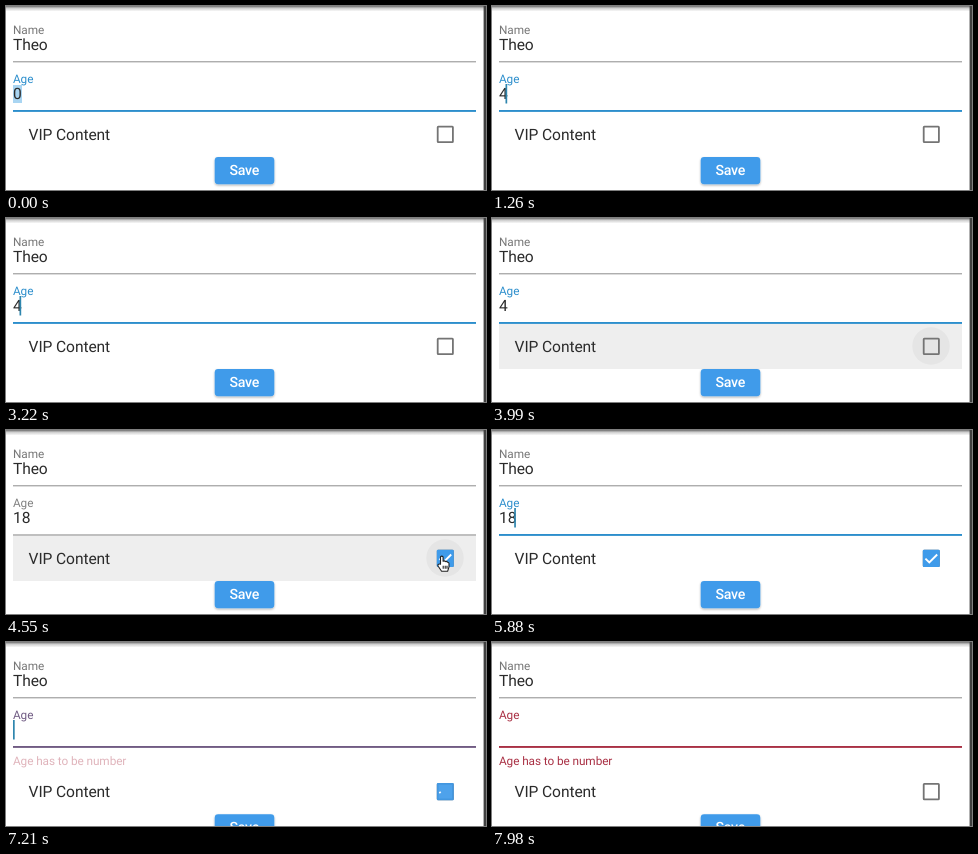
Recreate the animation shown at these times as an HTML page. Size 480 by 184 pixels, loop 8000 ms.

```html
<!DOCTYPE html>
<html lang="en">
<head>
<meta charset="utf-8">
<title>Profile form</title>
<style>
  html, body { margin: 0; width: 100%; height: 100%; overflow: hidden; background: #fff; }
  svg { display: block; width: 480px; height: 184px; }
  text {
    font-family: Roboto, "Open Sans", sans-serif; font-size: 15.6px; letter-spacing: -.1px;
    fill: #2b2b2b; text-rendering: geometricPrecision;
  }
  .small { font-size: 11.8px; letter-spacing: -.08px; fill: #777; }
  .button { font-size: 14.2px; letter-spacing: -.3px; font-weight: 500; fill: #fff; }
</style>
</head>
<body>
<svg viewBox="0 0 480 184">
  <defs>
    <linearGradient id="shade" x1="0" y1="0" x2="0" y2="1">
      <stop offset="0" stop-color="#6c6c6c"/>
      <stop offset=".4" stop-color="#cdcdcd"/>
      <stop offset="1" stop-color="#fff"/>
    </linearGradient>
    <filter id="lift" x="-20%" y="-30%" width="140%" height="180%">
      <feDropShadow dx="0" dy="1.2" stdDeviation="1.2" flood-opacity=".3"/>
    </filter>
  </defs>
  <rect width="480" height="184" fill="#fff"/>
  <rect width="480" height="5.5" fill="url(#shade)"/>

  <text class="small" x="7" y="28">Name</text>
  <text x="7" y="44">Theo</text>
  <rect x="7" y="55.3" width="463" height="1" fill="#8c8c8c"/>

  <g id="lower">
    <rect id="row" x="7" y="106" width="463" height="45" fill="#eee"/>
    <circle id="halo" cx="439" cy="128" r="18.7" fill="#000" fill-opacity=".04"/>
    <text x="22.6" y="133.8">VIP Content</text>
    <rect x="431.7" y="120.7" width="15.2" height="15.4" rx=".6" fill="none" stroke="#747474" stroke-width="1.8"/>
    <g id="checked">
      <rect x="430.8" y="119.8" width="17" height="17.2" rx="1" fill="#3f9bea"/>
      <path id="tick" d="M433.4 128.6 L437.3 132.5 L445.2 124.5" fill="none" stroke="#fff"
        stroke-width="1.9" pathLength="1" stroke-dasharray="1 2"/>
    </g>
    <rect x="208.7" y="151.1" width="59.6" height="27.1" rx="3.4" fill="#3f9bea" filter="url(#lift)"/>
    <text class="button" x="238.3" y="169.3" text-anchor="middle">Save</text>
  </g>

  <text id="label" class="small" x="7" y="77">Age</text>
  <rect id="selection" x="7" y="79" width="9" height="18" fill="#a9d5f2"/>
  <text id="age" x="7" y="93.2"></text>
  <rect id="caret" y="78" width="1.7" height="19.5" fill="#2f86ae"/>
  <rect id="line" x="7" width="463"/>
  <text id="error" class="small" x="7" y="123" style="fill:#a93044">Age has to be number</text>

  <rect x="477.6" y="0" width="2.4" height="184" fill="#404040"/>
  <g id="hand" fill="#fff" stroke="#222" stroke-width="1.1" stroke-linejoin="round">
    <path d="M-1.3 8V1Q-1.3-.2 0-.2Q1.3-.2 1.3 1V5Q2.6 4 3.6 5.3Q5 4.7 5.7 6Q7.2 5.8 7.2 7.4V10.5L5.8 15H-.2L-3.6 10Q-4.4 8.4-3.2 7.9Q-2.3 7.6-1.3 8Z"/>
    <path d="M1.4 9.5V12.5M3.4 9.5V12.5M5.2 9.5V12.5" fill="none"/>
  </g>
</svg>
<script>
  const LOOP = 8000;
  const TYPE = 70, HOVER = 3430, PRESS = 3990, TOGGLE = 4060, LEAVE = 5180,
        FOCUS = 5800, ERASE = 6510, CLEAR = 7130;
  const BLINK = 515, DIGIT = 8.7;
  const GREY = [128, 128, 128], BLUE = [44, 142, 204], RED = [169, 48, 68];

  const el = Object.fromEntries([...document.querySelectorAll("svg [id]")].map(n => [n.id, n]));
  const ramp = (t, start, span) => Math.min(1, Math.max(0, (t - start) / span));
  const smooth = p => p * p * (3 - 2 * p);
  const lerp = (a, b, p) => a + (b - a) * p;
  const mix = (a, b, p) => `rgb(${a.map((v, i) => Math.round(lerp(v, b[i], p)))})`;
  const set = (node, attrs) => { for (const k in attrs) node.setAttribute(k, attrs[k]); };
  const show = (node, on) => set(node, { opacity: Number(on) });

  function ageAt(t) {
    if (t < TYPE) return "0";
    if (t < TOGGLE) return "4";
    if (t < ERASE) return "18";
    return t < CLEAR ? "1" : "";
  }

  // The blink restarts on every edit or focus of the field.
  function caretOn(t) {
    if (t < TYPE || (t >= TOGGLE && t < FOCUS)) return false;
    const start = [CLEAR, ERASE, FOCUS, TYPE].find(s => t >= s);
    return Math.floor((t - start) / BLINK) % 2 === 0;
  }

  function draw(t) {
    const failed = t >= CLEAR;
    const age = ageAt(t);
    const focus = t < FOCUS ? 1 - ramp(t, TOGGLE, 200) : ramp(t, FOCUS, 80);
    const color = failed ? mix(BLUE, RED, ramp(t, CLEAR, 150)) : mix(GREY, BLUE, focus);

    el.age.textContent = age;
    el.label.style.fill = color;
    set(el.line, { y: lerp(104.5, 104, focus), height: lerp(1, 1.9, focus), fill: color });
    show(el.selection, t < TYPE);
    show(el.caret, caretOn(t));
    set(el.caret, { x: 7 + Math.max(0, age.length * DIGIT - 2.2) });
    show(el.error, smooth(ramp(t, CLEAR, 200)));

    set(el.lower, { transform: `translate(0 ${failed ? 21.2 : 0})` });
    show(el.row, t >= PRESS && t < FOCUS);
    show(el.halo, ramp(t, HOVER - 20, 90) * (1 - ramp(t, LEAVE, 100)));
    const check = ramp(t, TOGGLE, 200) * (1 - ramp(t, CLEAR, 150));
    show(el.checked, Math.min(1, check * 2));
    show(el.tick, check > .4);
    set(el.tick, { "stroke-dashoffset": 1 - ramp(check, .4, .6) });

    const move = smooth(ramp(t, LEAVE - 30, 450));
    show(el.hand, t >= TOGGLE && t < FOCUS);
    set(el.hand, { transform: `translate(${lerp(435.8, 39, move)} ${lerp(126.3, 114.5, move)})` });
  }

  function tick() {
    draw(performance.now() % LOOP);
    requestAnimationFrame(tick);
  }
  tick();
</script>
</body>
</html>
```
